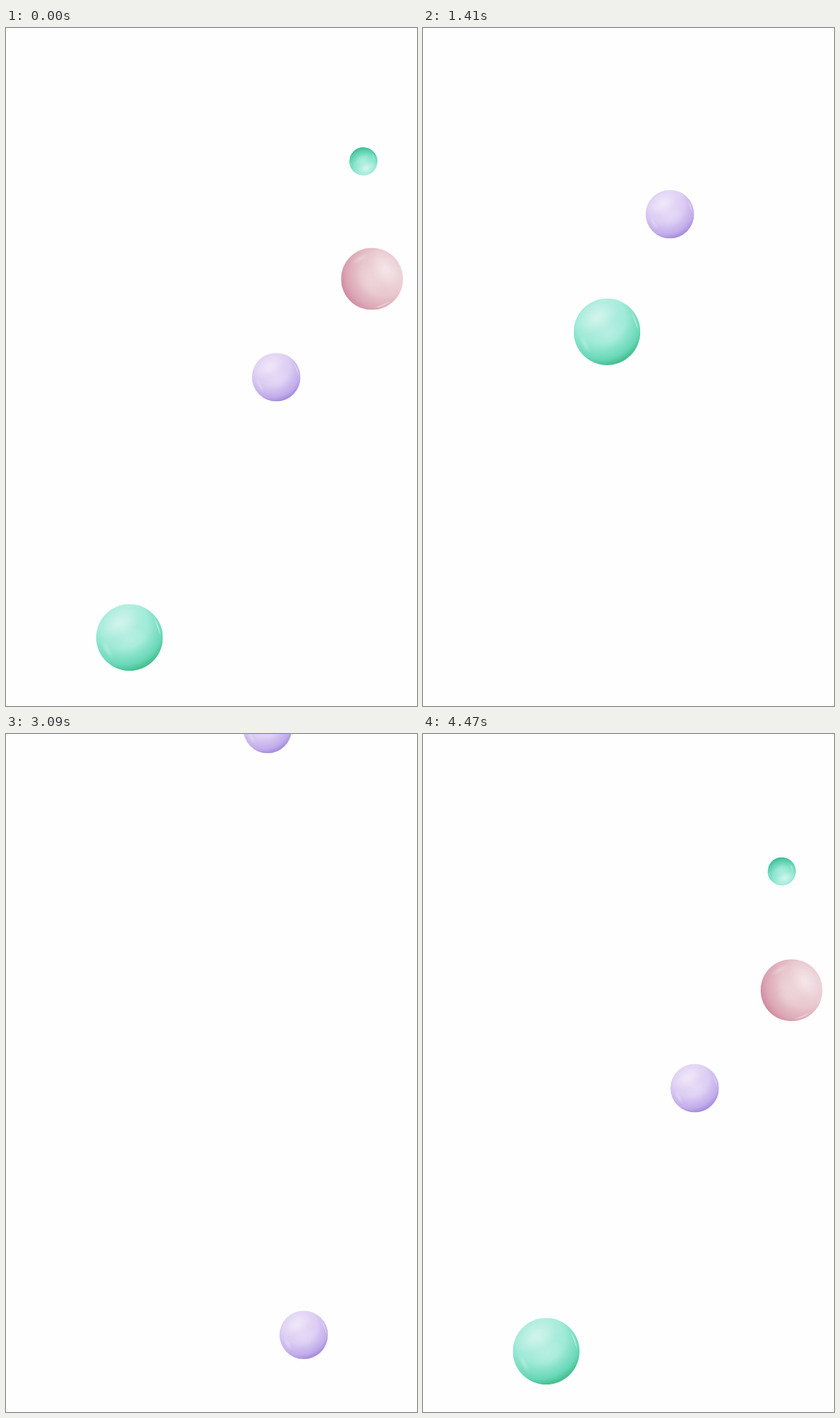
Animation, 583 px wide and 961 px high, one loop 4500 ms. Source, as an HTML page with a canvas:

```html
<!DOCTYPE html>
<html>
<head>
<meta charset="utf-8">
<title>Floating spheres</title>
<style>
  html, body { margin: 0; height: 100%; overflow: hidden; background: #fefefe; }
  canvas { display: block; }
</style>
</head>
<body>
<canvas width="583" height="961"></canvas>
<script>
const LOOP = 4500, STEP = 30;
const canvas = document.querySelector('canvas');
const ctx = canvas.getContext('2d');

// Colours run from the lit side to the shaded rim. Waypoints are [time, x, y];
// before the first and after the last one a ball drifts on in a straight line.
const balls = [
  { radius: 47.3, turn: 0, colors: ['#bcefe2', '#9fead8', '#6ad8b8', '#3fba8a'],
    path: [[-150, 173.4, 919], [0, 175.2, 863.9], [960, 233.4, 538.5], [1080, 238.4, 520],
           [1410, 261, 430.6], [2070, 291.6, 224], [2700, 291.4, 20]] },
  { radius: 34.4, turn: 0, colors: ['#e8dcf6', '#dccdf3', '#c2adea', '#a288dc'],
    path: [[-1800, 415.3, 950.5], [-990, 425, 745.3], [-30, 385.4, 502], [0, 383.3, 494.9],
           [960, 354.2, 338.3], [2070, 353.6, 155.3], [2700, 364.3, 55]] },
  { radius: 44, turn: 1.54, colors: ['#f0d9dd', '#e8c7ce', '#dba6b5', '#cf8aa1'],
    path: [[0, 519.2, 355.6], [960, 403.7, 114.3], [1410, 345, -58]] },
  { radius: 20, turn: 3.3, colors: ['#b8f2e4', '#8ee5cf', '#56cfab', '#38b98b'],
    path: [[-990, 601, 420], [0, 507, 189], [960, 473.5, 45.5]] }
];

// Velocity at waypoint i on one axis, weighted by the neighbouring intervals.
function velocity(path, i, axis) {
  const slope = k => (path[k + 1][axis] - path[k][axis]) / (path[k + 1][0] - path[k][0]);
  if (i === 0) return slope(0);
  if (i === path.length - 1) return slope(i - 1);
  const before = path[i][0] - path[i - 1][0], after = path[i + 1][0] - path[i][0];
  return (slope(i - 1) * after + slope(i) * before) / (before + after);
}

// Smooth Hermite curve through the waypoints.
function locate(path, time) {
  const next = path.findIndex(p => p[0] > time);
  if (next < 1) {
    const end = next < 0 ? path.length - 1 : 0;
    return [1, 2].map(axis => path[end][axis] + velocity(path, end, axis) * (time - path[end][0]));
  }
  const a = path[next - 1], b = path[next];
  const span = b[0] - a[0], u = (time - a[0]) / span, v = 1 - u;
  return [1, 2].map(axis =>
    v * v * (1 + 2 * u) * a[axis] + u * u * (1 + 2 * v) * b[axis] +
    u * v * span * (v * velocity(path, next - 1, axis) - u * velocity(path, next, axis)));
}

// Soft elliptical light on the unit sphere.
function glow(x, y, width, height, angle, alpha) {
  ctx.save();
  ctx.translate(x, y);
  ctx.rotate(angle);
  ctx.scale(width, height);
  const light = ctx.createRadialGradient(0, 0, 0, 0, 0, 1);
  [1, 0.5, 0].forEach((k, i) => light.addColorStop(i / 2, `rgba(255,255,255,${alpha * k})`));
  ctx.fillStyle = light;
  ctx.fillRect(-1, -1, 2, 2);
  ctx.restore();
}

// Thin bright sliver following the rim.
function crescent(from, to, radius, depth, alpha) {
  const mid = (from + to) / 2, bend = radius / Math.cos((to - from) / 2) - depth;
  ctx.beginPath();
  ctx.arc(0, 0, radius, from, to);
  ctx.quadraticCurveTo(bend * Math.cos(mid), bend * Math.sin(mid),
    radius * Math.cos(from), radius * Math.sin(from));
  ctx.fillStyle = `rgba(255,255,255,${alpha})`;
  ctx.fill();
}

function drawBall({ radius, turn, colors }, x, y) {
  ctx.save();
  ctx.translate(x, y);
  ctx.rotate(turn);
  ctx.scale(radius, radius);
  ctx.beginPath();
  ctx.arc(0, 0, 1, 0, Math.PI * 2);
  ctx.clip();
  const body = ctx.createRadialGradient(-0.2, -0.4, 0, -0.2, -0.4, 1.45);
  [0, 0.52, 0.84, 1].forEach((stop, i) => body.addColorStop(stop, colors[i]));
  ctx.fillStyle = body;
  ctx.fillRect(-1, -1, 2, 2);
  glow(-0.15, -1, 1.1, 0.6, 0, 0.16);
  glow(-0.35, -0.42, 0.7, 0.42, -0.45, 0.36);
  glow(0.08, 0.08, 0.55, 0.42, -0.3, 0.16);
  glow(-0.66, 0.38, 0.32, 0.1, 1.05, 0.28);
  crescent(-0.66, -0.06, 0.93, 0.08, 0.4);
  ctx.restore();
}

function tick() {
  const time = Math.floor((performance.now() % LOOP) / STEP) * STEP;
  ctx.fillStyle = '#fefefe';
  ctx.fillRect(0, 0, canvas.width, canvas.height);
  for (const ball of balls) {
    // The tail of one pass overlaps the start of the next.
    for (const t of [time - LOOP, time]) drawBall(ball, ...locate(ball.path, t));
  }
  requestAnimationFrame(tick);
}
tick();
</script>
</body>
</html>
```
